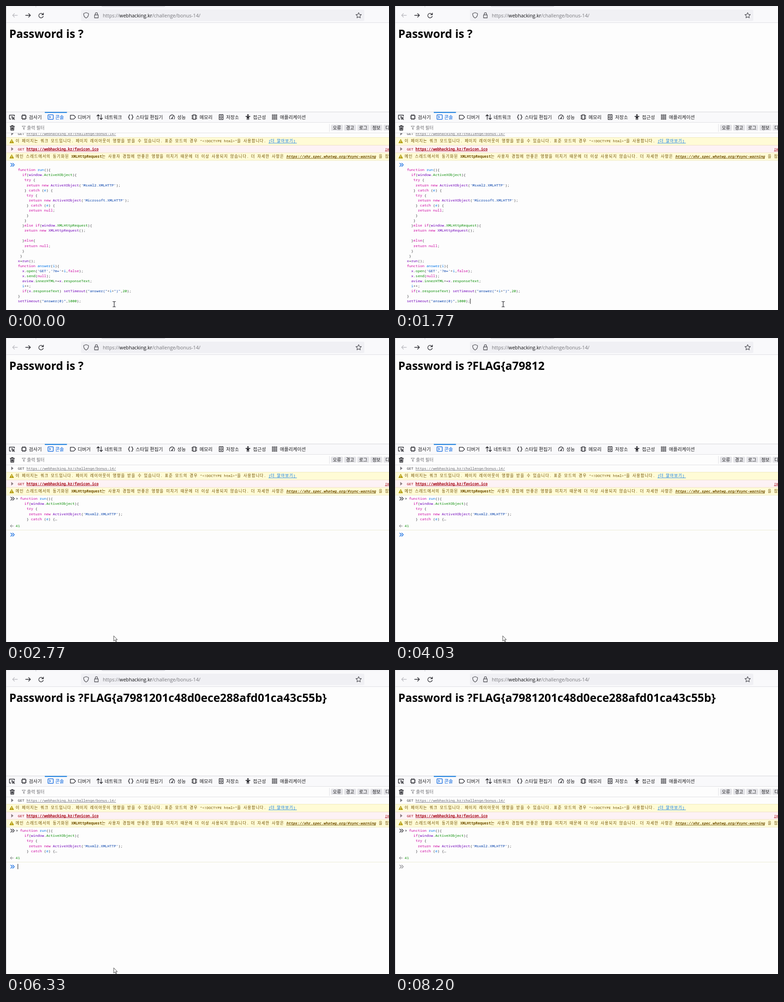
Recreate the animation shown at these times as an HTML page. Size 839 px wide and 667 px high, loop 8230 ms.

```html
<!DOCTYPE html>
<html lang="ko">
<head>
<meta charset="utf-8">
<style>
html, body { margin: 0; width: 100%; height: 100%; overflow: hidden; background: #fdfdfd; }
svg { display: block; }
.ui { font-family: 'Noto Sans CJK KR', 'Noto Sans CJK', sans-serif; font-size: 10.3px; }
.url { font-family: 'Open Sans', sans-serif; font-size: 10.67px; fill: #77777c; }
.title { font-family: 'Open Sans', sans-serif; font-size: 24.8px; font-weight: 700; fill: #050505; }
.mono { font-family: 'Noto Sans Mono', monospace; font-size: 7.97px; white-space: pre; }
.ko { font-family: 'Noto Sans CJK KR', 'Noto Sans CJK', sans-serif; font-size: 8.6px; letter-spacing: 1.07px; }
.icon { fill: none; stroke: #25252b; stroke-width: 1.3; stroke-linejoin: round; stroke-linecap: round; }
</style>
</head>
<body>
<svg id="stage" width="839" height="667" viewBox="0 0 839 667"></svg>
<script>
const LOOP = 8230, ENTER = 2210, FLAG_START = 3220, CHAR_MS = 71.4, POINTER_OUT = 7400, BLUR = 7700;
const FLAG = 'FLAG{a7981201c48d0ece288afd01ca43c55b}';
const CHAR_W = 4.78, LINE_H = 11.08;

const esc = s => s.replace(/&/g, '&amp;').replace(/</g, '&lt;');
const rect = (x, y, w, h, fill, extra = '') =>
  `<rect x="${x}" y="${y}" width="${w}" height="${h}" fill="${fill}" ${extra}/>`;
const icon = (d, extra = '') => `<path class="icon" d="${d}" ${extra}/>`;
const ui = (x, y, s, fill = '#18181b', extra = '') =>
  `<text class="ui" x="${x}" y="${y}" fill="${fill}" ${extra}>${s}</text>`;
const mono = (x, y, s, fill, extra = '') =>
  `<text class="mono" x="${x}" y="${y}" fill="${fill}" ${extra}>` +
  esc(s).replace(/[가-힣]+/g, '<tspan class="ko">$&</tspan>') + '</text>';
const link = (x, y, s, fill, extra = '') =>
  mono(x, y, s, fill, extra) + rect(x, y + 1.2, s.replace(/[가-힣]/g, '..').length * CHAR_W, 0.8, fill);

const COLORS = { str: '#003eaa', key: '#cc00a0', def: '#0074e8', prop: '#058b00', num: '#058b00', name: '#6f00b8' };
const TOKEN = new RegExp([
  `(?<str>'[^']*'|"[^"]*")`,
  '(?<key>\\b(?:function|if|try|return|new|catch|else|null|false)\\b)',
  '(?<def>(?<=function |catch \\()\\w+|\\bi\\b)',
  '(?<prop>(?<=\\.)\\w+)', '(?<num>\\d+)', '(?<name>\\w+)'
].join('|'), 'g');

function highlight(line) {
  return line.replace(TOKEN, (tok, ...rest) => {
    const groups = rest[rest.length - 1];
    const kind = Object.keys(groups).find(k => groups[k] !== undefined);
    return `<tspan fill="${COLORS[kind]}">${esc(tok)}</tspan>`;
  });
}

function codeBlock(x, y, lines) {
  return lines.map((line, i) => {
    const body = line.trimStart(), indent = line.length - body.length;
    return `<text class="mono" x="${x + indent * CHAR_W}" y="${y + i * LINE_H}" fill="#38383d">${highlight(body)}</text>`;
  }).join('');
}

const CODE = `function run(){
  if(window.ActiveXObject){
   try {
    return new ActiveXObject('Msxml2.XMLHTTP');
   } catch (e) {
    try {
     return new ActiveXObject('Microsoft.XMLHTTP');
    } catch (e) {
     return null;
    }
   }
  }else if(window.XMLHttpRequest){
   return new XMLHttpRequest();

  }else{
   return null;
  }
 }
x=run();
function answer(i){
  x.open('GET','?m='+i,false);
  x.send(null);
  aview.innerHTML+=x.responseText;
  i++;
  if(x.responseText) setTimeout("answer("+i+")",20);
}
setTimeout("answer(0)",1000);`.split('\n');

const chevrons = (y, extra = '') => icon(`M10.5 ${y - 3.5}l3.5 3.5l-3.5 3.5M14.7 ${y - 3.5}l3.5 3.5l-3.5 3.5`, extra);
const triangle = (x, y, s, fill) => `<path d="M${x} ${y - s}l${s * 1.2} ${s}l${-s * 1.2} ${s}z" fill="${fill}"/>`;
const warning = y => `<path d="M12.5 ${y - 4}l4.3 8h-8.6z" fill="#b39a00" stroke="#b39a00" stroke-linejoin="round"/>` +
  rect(12, y - 1.8, 1.1, 3, '#fff') + rect(12, y + 2, 1.1, 1.1, '#fff');

function browserBar() {
  return rect(0, 0, 839, 36, '#f9f9fb') + rect(0, 0, 839, 1.5, '#f0f0f4') +
    rect(65, 0, 1, 3, '#ccccd2') + rect(209, -6, 140, 7, '#fff', 'rx="3" stroke="#b9b9c2"') +
    rect(0, 36, 839, 1, '#dedee3') + rect(164, 8, 621, 25, '#f0f0f4', 'rx="3"') +
    icon('M25 20.5H14.5M18.5 16.5l-4 4l4 4', 'style="stroke:#bdbdc2"') +
    icon('M43 20.5h10.5M49.5 16.5l4 4l-4 4') +
    icon('M81 18.3A5 5 0 1 0 81.6 22.5M82 15.3v3.7h-3.7') +
    icon('M175.5 14.5l5.3 2q.3 7.500-5.3 10q-5.600-2.500-5.300-10z', 'style="stroke:#55555b"') +
    icon('M194 19.500h8v6.500h-8zM195.600 19.500v-2.500a2.400 2.400 0 0 1 4.800 0v2.500', 'style="stroke:#55555b"') +
    `<text class="url" x="212" y="24.500">https://<tspan fill="#111114">webhacking.kr</tspan>/challenge/bonus-14/</text>` +
    icon('M772.5 14.500l1.800 3.900l4.200.5l-3.100 2.900l.8 4.200l-3.700-2.100l-3.700 2.100l.8-4.200l-3.100-2.900l4.200-.5z', 'style="stroke:#45454b;stroke-width:1.100"');
}

function toolTabs() {
  const labels = [[50, '검사기'], [108, '콘솔'], [157, '디버거'], [216, '네트워크'], [284, '스타일 편집기'],
    [375, '성능'], [424, '메모리'], [482, '저장소'], [541, '접근성'], [600, '애플리케이션']];
  let grid = '';
  for (let i = 0; i < 9; i++) grid += `M${583.5 + i % 3 * 4} ${238.7 + Math.floor(i / 3) * 4}h2v2h-2z`;
  return rect(0, 232, 839, 24, '#f9f9fb') + rect(0, 232, 839, 1, '#d5d5da') + rect(0, 255, 839, 1, '#e0e0e4') +
    rect(85, 232.5, 48.5, 2, '#0a78e0') +
    labels.map(([x, s]) => ui(x, 247.7, s, s === '콘솔' ? '#0060df' : undefined)).join('') +
    icon('M18.500 242v-2.500h-11v8.500h3.500M12.500 242.500l6 3l-2.600.8l-1 2.700zM16 246.500l2.700 2.700') +
    icon('M35.500 240h7.500v7.500h-7.500zM37.300 240v-2M41.200 240v-2M37.300 249.500v-2M41.200 249.500v-2M33.500 241.800h2M33.500 245.700h2M43 241.800h2M43 245.700h2') +
    icon('M93 238.700h9.500q1 0 1 1v8q0 1-1 1h-9.500q-1 0-1-1v-8q0-1 1-1zM95 241.500l2.300 2.200l-2.300 2.200', 'style="stroke:#0060df"') +
    icon('M141 239.700h7.500l4 4.200l-4 4.200h-7.500z') +
    icon('M202 249v-10.500M199 241.500l3-3l3 3M208.500 238.500v10.500M205.500 246l3 3l3-3') +
    icon('M271.500 239q-2 0-2 2v1.500l-1.500 1.300l1.500 1.300v1.500q0 2 2 2M275 239q2 0 2 2v1.500l1.500 1.300l-1.500 1.300v1.500q0 2-2 2') +
    icon('M359.500 248a5.500 5.500 0 1 1 8.500 0M363.700 246.300l2.500-4.300') +
    `<circle cx="363.600" cy="246.800" r="1.600" fill="#25252b"/>` +
    icon('M409.500 239h6v9.500h-6zM407 240.500h2M407 243.700h2M407 247h2M416 240.500h2M416 243.700h2M416 247h2') +
    icon('M467 238.500h8.500v10.700h-8.500zM467 243.800h8.500M470 241.200h2.500M470 246.500h2.500') +
    `<circle cx="530" cy="239.300" r="1.700" fill="#25252b"/>` +
    icon('M525.500 242.300h9M530 242.500v3M528.500 243v6M531.500 243v6', 'style="stroke-width:1.700"') +
    icon(grid, 'style="stroke-width:1"');
}

function filterBar() {
  const buttons = ['오류', '경고', '로그', '정보', '디버그'].map((s, i) => {
    const x = 712 + i * 28.8;
    return rect(x, 260.5, i < 4 ? 26 : 40, 13, '#e3e3e7', 'rx="1.500"') +
      ui(x + 4, 270.700, s, '#18181b', 'style="font-size:9.700px"');
  }).join('');
  return rect(0, 256, 839, 22, '#fdfdfd') + rect(0, 278, 839, 1, '#e0e0e4') + rect(708, 259, 1, 17, '#e0e0e4') +
    icon('M9 264h9.500M12 264v-1.600h3.500v1.600M10 264.500l.5 8h6.500l.5-8M12.200 266.500v4M13.700 266.500v4M15.300 266.500v4') +
    icon('M35.500 263.500h7l-2.700 3.500v4.300l-1.600-1.300v-3z', 'style="stroke:#77777c;stroke-width:.9"') +
    ui(46, 270.700, '출력 필터', '#737378', 'style="font-size:9.700px"') + buttons;
}

function logRows() {
  const brown = '#715100', red = '#a4000f';
  const bold = 'font-weight="600"';
  return rect(0, 294, 839, 17, '#fffbd6') + rect(0, 311, 839, 17, '#fdf2f5') + rect(0, 328, 839, 16.500, '#fffbd6') +
    rect(0, 294, 839, .8, '#ece5b5') + rect(0, 311, 839, .8, '#ecdcc0') +
    rect(0, 327.500, 839, .8, '#ecdcc0') + rect(0, 344.500, 839, .8, '#ece5b5') +
    triangle(11.500, 286, 4, '#77777c') + mono(26, 289, 'GET', '#38383d') +
    link(45, 289, 'https://webhacking.kr/challenge/bonus-14/', '#65656b') +
    warning(302.500) + mono(21, 305.300, '이 페이지는 쿼크 모드입니다. 페이지 레이아웃이 영향을 받을 수 있습니다. 표준 모드의 경우 “<!DOCTYPE html>”을 사용합니다.', brown) +
    link(575, 305.300, '[더 알아보기]', '#0074e8') +
    triangle(11.500, 319.700, 4, '#8a7a7e') + mono(26, 322.500, 'GET', red) +
    link(45, 322.500, 'https://webhacking.kr/favicon.ico', red, bold) + link(830, 322.500, '[HTTP', red) +
    warning(336) + mono(21, 339, '메인 스레드에서의 동기화된', brown) + mono(143, 339, 'XMLHttpRequest', brown, bold) +
    mono(210, 339, '는 사용자 경험에 안좋은 영향을 미치기 때문에 더 이상 사용되지 않습니다. 더 자세한 사항은', brown) +
    link(614, 339, 'https://xhr.spec.whatwg.org/#sync-warning', brown, bold + ' font-style="italic"') +
    mono(816.500, 339, '을 참고', brown);
}

const editing = chevrons(348.500, 'style="stroke:#0060df"') + codeBlock(26, 362.300, CODE);
const evaluated = chevrons(352.500) + triangle(23, 352.500, 2.600, '#77777c') +
  codeBlock(30.800, 355.300, [...CODE.slice(0, 4), CODE[4] + '…']) +
  icon('M16 412.500H9.500M12.500 409.500l-3 3l3 3', 'style="stroke:#77777c;stroke-width:1"') +
  mono(21, 415.300, '41', COLORS.num) + rect(0, 421, 839, .8, '#e8e6cc') +
  chevrons(431.500, 'id="prompt"');

const stage = document.getElementById('stage');
stage.innerHTML = `<clipPath id="pane"><rect x="0" y="279" width="839" height="388"/></clipPath>` +
  rect(0, 0, 839, 667, '#fdfdfd') +
  `<g clip-path="url(#pane)"><g id="log">${logRows()}</g><g id="editing">${editing}</g><g id="evaluated">${evaluated}</g></g>` +
  browserBar() + toolTabs() + filterBar() + rect(0, 0, 1, 667, '#c9c9ce') +
  '<text id="title" class="title" x="7" y="70"></text>' +
  rect(0, 0, 1, 11.500, '#111', 'id="caret"') +
  icon('M234 648.500h2l1 .7l1-.7h2M237 649.200v10M234 660h2l1-.8l1 .8h2', 'id="beam" style="stroke-width:1.200"') +
  `<path id="arrow" d="M236 653.500v11.500l2.700-2.500l1.900 4.200l1.700-.8l-1.900-4h3.600z" fill="#fff" stroke="#333" stroke-width=".9"/>`;

const el = Object.fromEntries(['log', 'editing', 'evaluated', 'prompt', 'title', 'caret', 'beam', 'arrow']
  .map(id => [id, document.getElementById(id)]));
const show = (node, on) => node.setAttribute('visibility', on ? 'visible' : 'hidden');

function draw(t) {
  const done = t >= ENTER;
  const typed = Math.max(0, Math.floor((t - FLAG_START) / CHAR_MS));
  el.title.textContent = 'Password is ?' + FLAG.slice(0, typed);
  el.log.setAttribute('transform', `translate(0 ${done ? 0 : -6})`);
  show(el.editing, !done);
  show(el.evaluated, done);
  show(el.beam, !done);
  show(el.arrow, done && t < POINTER_OUT);
  el.prompt.style.stroke = t < BLUR ? '#0060df' : '#85858a';

  const blink = t - (done ? ENTER : 350);
  show(el.caret, blink >= 0 && blink % 1000 < 500 && t < BLUR);
  el.caret.setAttribute('x', done ? 25.5 : 164.5);
  el.caret.setAttribute('y', done ? 425.5 : 642);
}

const start = performance.now();
function tick() {
  draw((performance.now() - start) % LOOP);
  requestAnimationFrame(tick);
}
tick();
</script>
</body>
</html>
```
